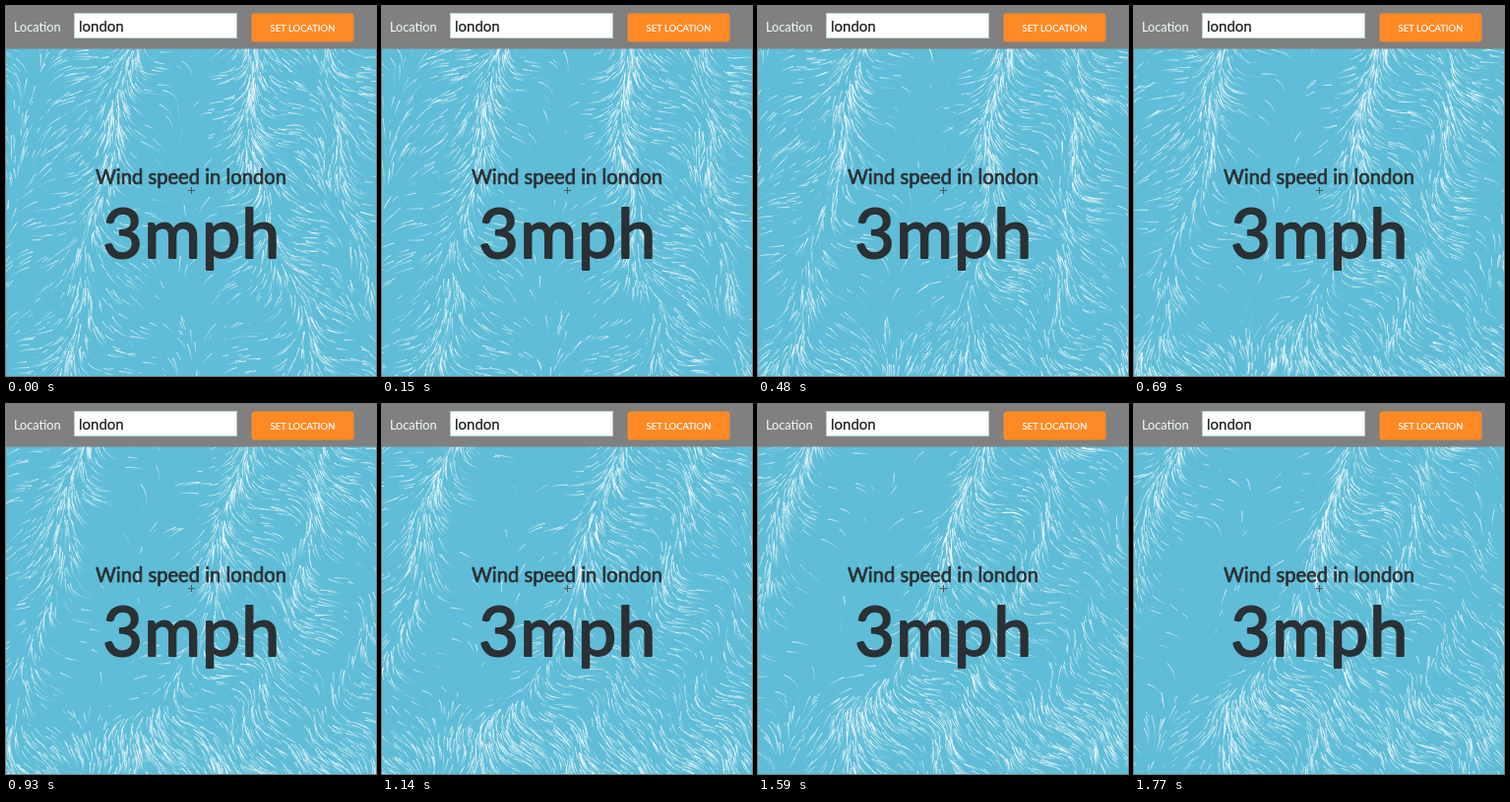
Animation of 376 by 376 pixels, one loop 1800 ms. Source, as an HTML page with a canvas:

```html
<!DOCTYPE html>
<html lang="en">
<head>
<meta charset="utf-8">
<title>Wind speed</title>
<style>
  html, body { margin: 0; width: 100%; height: 100%; overflow: hidden; background: #5fbdd8; }
  canvas, svg { position: absolute; left: 0; top: 0; width: 376px; height: 376px; }
  text { font-family: Lato, "Open Sans", sans-serif; }
  .ink { fill: #2b3033; stroke: #2b3033; stroke-linejoin: round; text-anchor: middle; }
</style>
</head>
<body>
<canvas id="wind" width="376" height="376"></canvas>
<svg viewBox="0 0 376 376">
  <rect width="376" height="43.5" fill="#808080"/>
  <text x="8" y="26" font-size="12.7" fill="#f4fcff">Location</text>
  <rect x="69.5" y="7.5" width="165" height="25" fill="#fff" stroke="#b9d3d6"/>
  <text x="74" y="25.500" font-size="15" fill="#1c1f21" stroke="#1c1f21" stroke-width=".25">london</text>
  <rect x="249.5" y="7.5" width="104" height="29" rx="3" fill="#ff8925"/>
  <text x="301.5" y="25.5" font-size="9.5" fill="#fff" stroke="#fff" stroke-width=".2" text-anchor="middle">SET LOCATION</text>
  <text class="ink" x="188" y="181" font-size="20.2" stroke-width=".7">Wind speed in london</text>
  <text class="ink" x="189" y="256" font-size="70" stroke-width="2" letter-spacing="1.2">3mph</text>
  <path d="M188.500 184v7M185 187.500h7" stroke="#555" fill="none"/>
</svg>
<script>
const SIZE = 376, TOP = 44, LOOP = 1800, STEP = 30;
const COUNT = 6500, LIFE = 30, TAIL = 16, SPEED = 1.1, LEVELS = 6;
const ctx = document.getElementById('wind').getContext('2d');

// x of each crest at y = 60, 150, 240, 330; one row per third of the loop
const LEFT = [[132, 105, 92, 72], [95, 80, 62, 35], [68, 38, 18, -15], [40, 5, -30, -60]];
const RIGHT = [[246, 250, 268, 300], [245, 232, 222, 195], [236, 212, 182, 125], [216, 195, 150, 110]];

const clamp = (v, a, b) => Math.max(a, Math.min(b, v));
const mix = (a, b, k) => a + (b - a) * k;
const bump = v => Math.exp(-v * v);

function hash(a, b) {
  let h = Math.imul(a + 1, 0x9E3779B1) ^ Math.imul(b + 7, 0x85EBCA6B);
  h = Math.imul(h ^ (h >>> 15), 0x2C1B3C6D);
  h = Math.imul(h ^ (h >>> 12), 0x297A2D39);
  return ((h ^ (h >>> 15)) >>> 0) / 4294967296;
}

function crest(rows, y, t) {
  const tt = clamp(t, 0, 1) * 3, r = Math.min(2, Math.floor(tt));
  const yy = (y - 60) / 90, c = clamp(Math.floor(yy), 0, 2);
  const at = row => mix(row[c], row[c + 1], yy - c);
  return mix(at(rows[r]), at(rows[r + 1]), tt - r);
}

function lowBand(x, y, t) {
  const mid = 395 - 75 * t + 10 * Math.sin(x * .025 + 1);
  const reach = clamp((x + 60 - 150 * (t - .3)) / 60, 0, 1);
  return bump((y - mid) / 26) * reach * clamp(t * 2.4, 0, 1);
}

function density(x, y, t) {
  const a = crest(LEFT, y, t), b = crest(RIGHT, y, t);
  const early = clamp(1 - t * 2, 0, 1);
  const east = clamp((x - b) / 40, 0, 1);
  const west = clamp((a - x) / 40, 0, 1) * clamp((300 - y) / 120, 0, 1);
  const patch = .8 + .5 * Math.sin(x * .042 - y * .021 + 4 * t) * Math.sin(y * .038 + x * .012);
  const high = clamp((260 - y) / 100, .35, 1);
  let v = .03 + .08 * early + (.33 * east + .22 * west) * patch;
  v += .85 * high * (bump((x - a) / 22) + bump((x - b) / 25));
  v += .35 * bump((x - b - 80) / 20) * high;
  v += .8 * lowBand(x, y, t);
  v += .25 * bump((x - 45) / 60) * bump((y - 345) / 42);
  return v;
}

// Strands lean towards the nearest crest and lie flatter away from it
function lean(x, y, t, a, b) {
  const wave = w => 1.2 * Math.sin(2 * Math.PI * w);
  const base = (x < a ? wave((x - a) / 200)
    : x > b ? Math.abs(wave((x - b) / 160))
    : wave((x - a) / (b - a))) + .3 * Math.sin(x * .031 + y * .045 + 2 * t);
  return mix(base, base * .4 + .4, lowBand(x, y, t));
}

function draw(frame) {
  const t = frame * STEP / LOOP;
  const paths = Array.from({ length: LEVELS }, () => new Path2D());
  const rows = Array.from({ length: SIZE + 40 }, (_, y) => [crest(LEFT, y, t), crest(RIGHT, y, t)]);
  for (let i = 0; i < COUNT; i++) {
    const clock = frame + LIFE + Math.floor(hash(i, 901) * LIFE);
    const turn = Math.floor(clock / LIFE), age = clock % LIFE;
    const seed = turn * 5;
    let x = hash(i, seed) * (SIZE + 20) - 10;
    let y = TOP + hash(i, seed + 1) * (SIZE - TOP + 20);
    const midT = (frame - age + LIFE / 2) * STEP / LOOP;
    if (hash(i, seed + 2) > density(x, y - 12, midT)) continue;

    const jitter = (hash(i, seed + 3) - .5) * .4;
    const pace = SPEED * (.7 + .6 * hash(i, seed + 4));
    const fade = Math.min(1, (LIFE - age) / 8, age / 8);
    const from = Math.max(0, age - TAIL);
    for (let k = 0; k < age; k++) {
      const [a, b] = rows[clamp(Math.round(y), 0, SIZE + 39)];
      const turnBy = lean(x, y, t, a, b) + jitter;
      const nx = x - Math.sin(turnBy) * pace, ny = y - Math.cos(turnBy) * pace;
      if (k >= from) {
        const strength = (1 - (age - 1 - k) / TAIL) * fade;
        const path = paths[clamp(Math.floor(strength * LEVELS), 0, LEVELS - 1)];
        path.moveTo(x, y);
        path.lineTo(nx, ny);
      }
      x = nx;
      y = ny;
    }
  }
  ctx.globalAlpha = 1;
  ctx.fillStyle = '#5fbdd8';
  ctx.fillRect(0, 0, SIZE, SIZE);
  ctx.strokeStyle = '#fff';
  ctx.lineWidth = 1;
  paths.forEach((path, n) => {
    ctx.globalAlpha = .1 + .7 * n / (LEVELS - 1);
    ctx.stroke(path);
  });
}

const start = performance.now();
let shown = -1;
function tick() {
  const frame = Math.floor((performance.now() - start) % LOOP / STEP);
  if (frame !== shown) draw(shown = frame);
  requestAnimationFrame(tick);
}
tick();
</script>
</body>
</html>
```
